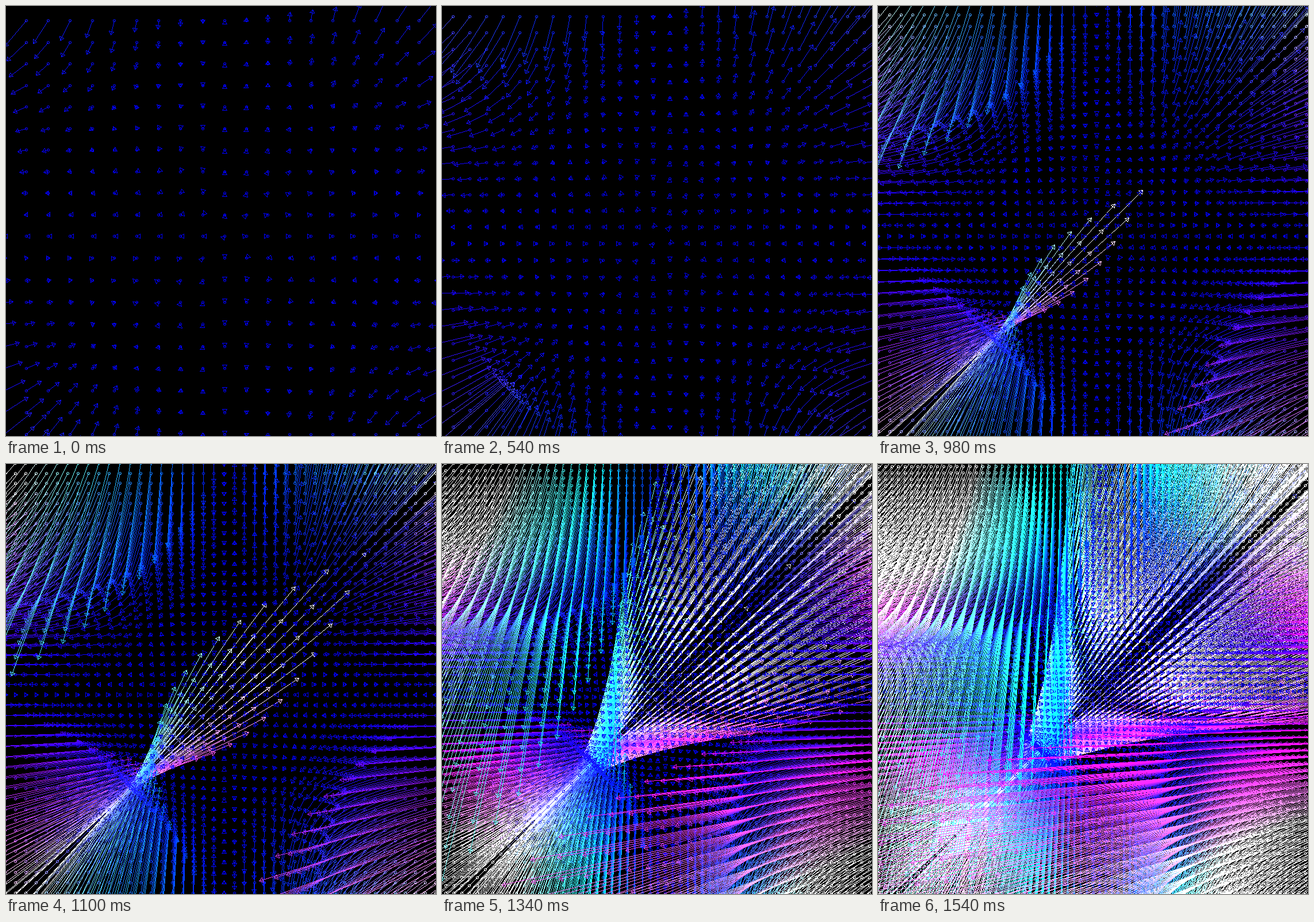
Animation, 748 px wide and 748 px high, one loop 1.64 s. Source, as an HTML page with a canvas:

```html
<!DOCTYPE html>
<html>
<head>
<meta charset="utf-8">
<style>
  html, body { margin: 0; width: 100%; height: 100%; overflow: hidden; background: #000; }
  canvas { display: block; }
</style>
</head>
<body>
<canvas id="stage" width="748" height="748"></canvas>
<script>
const SIZE = 748, LOOP = 1640, MIRROR = 780, LIMIT = 789.5;
const starts = [0, 320, 430, 540, 660, 760, 860, 980, 1100, 1220, 1340, 1440, 1540];
const ctx = document.getElementById('stage').getContext('2d');

// Vector field (x^3 y, x y^3) sampled on a grid that gets denser with zoom
function render(zoom) {
  const image = ctx.createImageData(SIZE, SIZE);
  const pixels = new Uint32Array(image.data.buffer).fill(0xff000000);
  const extent = 10 * 1.1 ** zoom;
  const gain = 2.44e-9 * 1.333 ** zoom;
  const origin = 379.5 + 0.45 * zoom;
  const center = 368.8 + 11.2 * Math.exp(-((zoom / 4.6) ** 2));
  const right = 375 / extent;
  const left = (375 + Math.min(0.87 * extent, 15)) / extent;
  let color;

  const plot = (x, y) => {
    if (x >= 0 && x < SIZE && y >= 0 && y < SIZE) pixels[y * SIZE + x] = color;
  };

  // Hard-edged line, one pixel wide
  const line = (x0, y0, x1, y1) => {
    x0 = Math.round(x0); y0 = Math.round(y0);
    const dx = Math.round(x1) - x0, dy = Math.round(y1) - y0;
    const steps = Math.max(Math.abs(dx), Math.abs(dy), 1);
    for (let i = 0; i <= steps; i++) {
      plot(Math.round(x0 + dx * i / steps), Math.round(y0 + dy * i / steps));
    }
  };

  const ring = (x, y) => {
    x = Math.round(x); y = Math.round(y);
    for (let i = -1; i <= 1; i++) {
      plot(x + i, y - 2); plot(x + i, y + 2);
      plot(x - 2, y + i); plot(x + 2, y + i);
    }
  };

  const arrow = (x, y, dx, dy) => {
    const level = d => Math.min(255, Math.abs(d) * 0.65) | 0;
    color = (0xffff0000 | level(dy) << 8 | level(dx)) >>> 0;
    const angle = Math.atan2(dy, dx), c = Math.cos(angle), s = Math.sin(angle);
    const tx = x + dx, ty = y + dy;
    const ax = tx - 6 * c - 4 * s, ay = ty - 6 * s + 4 * c;
    const bx = tx - 6 * c + 4 * s, by = ty - 6 * s - 4 * c;
    ring(x, y);
    line(x, y, tx, ty);
    line(tx, ty, ax, ay);
    line(tx, ty, bx, by);
    line(ax, ay, bx, by);
  };

  const spots = [];
  for (let u = -extent, p; (p = center + u * (u < 0 ? left : right)) < LIMIT; u++) spots.push(p);

  for (const px of spots) {
    for (const py of spots) {
      const x = px - origin, y = py - origin;
      arrow(px, MIRROR - py, gain * x ** 3 * y, -gain * x * y ** 3);
    }
  }
  return image;
}

const views = starts.map((_, i) => render(i < 10 ? i : i + 1));
let shown = -1;

function tick() {
  const time = performance.now() % LOOP;
  const index = starts.findLastIndex(start => start <= time);
  if (index !== shown) ctx.putImageData(views[shown = index], 0, 0);
  requestAnimationFrame(tick);
}
tick();
</script>
</body>
</html>
```
